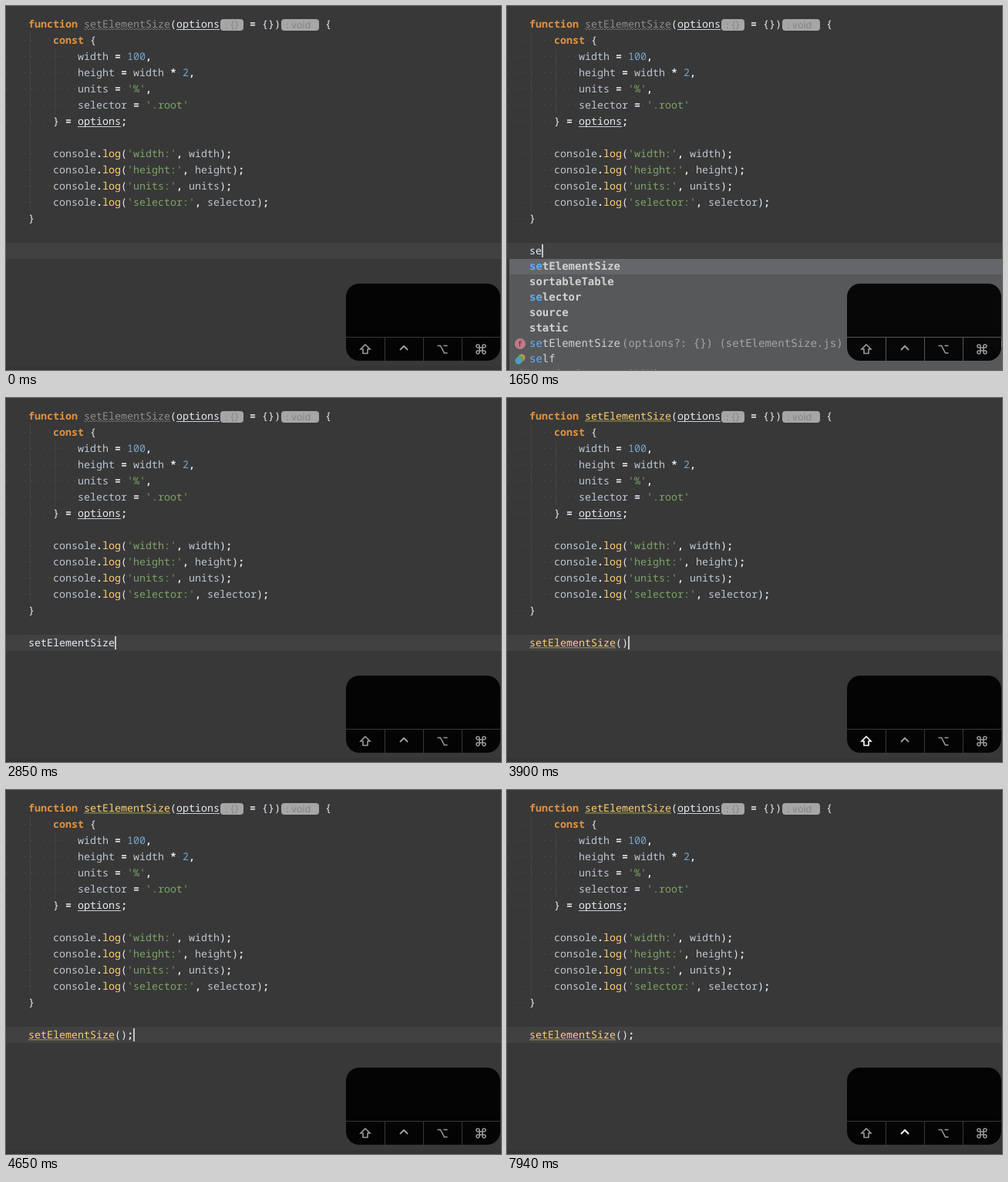
Animation of 642 by 472 pixels, one loop 8 s. Source, as an HTML page with a canvas:

```html
<!DOCTYPE html>
<html lang="en">
<head>
<meta charset="utf-8">
<title>Code completion</title>
<style>
html, body { margin: 0; width: 100%; height: 100%; overflow: hidden; background: #383838; }
canvas { display: block; }
</style>
</head>
<body>
<canvas id="stage" width="642" height="472"></canvas>
<script>
const ctx = document.getElementById('stage').getContext('2d');
ctx.textRendering = 'geometricPrecision';

const LOOP = 8000, LEFT = 29, CHAR = 8, LINE = 21, TOP = 13, ROW = 20;
const CODE = '13.33px "Noto Sans Mono", monospace';
const LIST = '14px "DejaVu Sans Mono", monospace';
const UI = 'Inter, sans-serif';
const COLORS = {
  keyword: '#e5923a', text: '#bcc5d0', white: '#e4ebf5', number: '#74a5cc',
  string: '#7da365', method: '#ffd06e', unused: '#8d8d8d', mark: '#7d8148',
  match: '#62aefa', item: '#d2d2d2', tail: '#a4a4a4'
};

const lineTop = n => TOP + n * LINE;

const source = [
  'function setElementSize(options',
  '    const {',
  '        width = 100,',
  '        height = width * 2,',
  "        units = '%',",
  "        selector = '.root'",
  '    } = options;',
  '',
  "    console.log('width:', width);",
  "    console.log('height:', height);",
  "    console.log('units:', units);",
  "    console.log('selector:', selector);",
  '}'
];

// Timelines: [start in ms, value]
const typed = [
  [0, ''], [1500, 's'], [1650, 'se'], [1950, 'set'], [2250, 'setE'],
  [2850, 'setElementSize'], [3750, 'setElementSize()'], [4500, 'setElementSize();']
];
const caretColumn = [
  [0, -1], [450, 0], [1050, -1], [1500, 1], [1650, 2], [1950, 3], [2250, 4],
  [2850, 14], [3450, -1], [3750, 15], [3900, 16], [4500, 17],
  [5250, 16], [5400, 15], [5550, 14], [5700, 13], [7050, -1], [7500, 13], [7940, -1]
];
const usages = [[0, false], [3300, true], [4950, false], [6000, true]];
const braces = [[0, false], [4050, true], [4500, false], [5250, true], [5400, false], [5550, true], [5700, false]];
const popup = [[0, null], [1500, 'first'], [1800, 'narrow'], [2400, 'final'], [2850, null], [4050, 'after'], [4500, null]];
const heldKey = [[0, ''], [2100, 'shift'], [2400, ''], [3450, 'shift'], [4050, ''], [7790, 'control']];

// Suffix "+" marks a function, "*" a plain global; the rest are bold words.
const lists = {
  first: ['setElementSize', 'sortableTable', 'selector', 'source', 'static', 'setElementSize+', 'self*', 'sessionStorage (DOM)*'],
  narrow: ['setElementSize', 'sortableTable', 'selector', 'selectedToElem', 'selected', 'setElementSize+', 'self*', 'sessionStorage (DOM)*'],
  final: ['setElementSize', 'sortableTable', 'selector', 'selectedToElem', 'selected', 'setElementSize+'],
  after: [' {', ';', '{', ' throws', ' :', 'setElementSize+', 'this']
};

const keys = [
  ['shift', 466, 445, 'M0-6L6 0H3V5.5H-3V0H-6Z'],
  ['control', 516, 443, 'M-5 3L0-2L5 3'],
  ['option', 566, 445, 'M-6.5-4.5H-2.5L2.5 5H6.5M1.5-4.5H6.5'],
  ['command', 616, 445, 'M-2-2H2V2H-2ZM-2-2H-4a2 2 0 1 1 2-2ZM2-2V-4a2 2 0 1 1 2 2ZM2 2H4a2 2 0 1 1-2 2ZM-2 2V4a2 2 0 1 1-2-2Z']
];

function valueAt(timeline, t) {
  return timeline.reduce((value, [start, next]) => t >= start ? next : value, timeline[0][1]);
}

function rect(x, y, w, h, color) {
  ctx.fillStyle = color;
  ctx.fillRect(x, y, w, h);
}

function text(str, x, y, color, font) {
  ctx.font = font;
  ctx.fillStyle = color;
  ctx.fillText(str, x, y);
}

function disc(x, y, r, color) {
  ctx.fillStyle = color;
  ctx.beginPath();
  ctx.arc(x, y, r, 0, 7);
  ctx.fill();
}

function wave(x, y, width) {
  ctx.strokeStyle = '#858585';
  ctx.lineWidth = 0.8;
  ctx.beginPath();
  for (let i = 0; i <= width; i += 2) ctx.lineTo(x + i, y + (i % 4 ? 1 : -1));
  ctx.stroke();
}

function tokenStyle(token, known) {
  if (/^(function|const)$/.test(token)) return ['keyword', 'bold '];
  if (token === 'log') return ['method', ''];
  if (token === 'setElementSize') return [known ? 'method' : 'unused', ''];
  if (token[0] === "'") return ['string', ''];
  if (/^\d/.test(token)) return ['number', ''];
  if (token === 'options') return ['white', ''];
  if (/^\w/.test(token)) return ['text', ''];
  return ['white', /[.,;=*]/.test(token) ? 'bold ' : ''];
}

function codeLine(str, x, top, known, marked) {
  for (const token of str.match(/'[^']*'|\w+|[^\w']/g) || []) {
    const width = token.length * CHAR;
    if (token === ' ') {
      rect(x + 3.5, top + 10, 1, 1, '#555');
    } else {
      const [color, weight] = tokenStyle(token, known);
      text(token, x, top + 15, COLORS[color], weight + CODE);
      if (token === 'options') rect(x, top + 17, width, 1, '#c5cbd3');
      if (token === 'setElementSize') {
        if (marked) rect(x, top + 16, width, 1.5, COLORS.mark);
        else if (!known) wave(x, top + 17, width);
      }
    }
    x += width;
  }
}

function badge(label, x, width) {
  ctx.fillStyle = '#a6a6a6';
  ctx.beginPath();
  ctx.roundRect(x, 17, width, 15, 4);
  ctx.fill();
  text(label, x + 6, 29, '#858585', '12.5px ' + UI);
}

function drawSource(known, marked) {
  rect(31, 33, 1, 232, '#434343');
  rect(63, 54, 1, 85, '#434343');
  source.forEach((line, n) => {
    if (line) codeLine('    ' + line, LEFT - 4 * CHAR, lineTop(n), known, marked);
  });
  badge(': {}', 278, 30);
  codeLine(' = {})', 308, TOP);
  badge(': void', 357, 49);
  codeLine(' {', 406, TOP);
}

function drawTypedLine(t, known, marked) {
  const top = lineTop(14), str = valueAt(typed, t), column = valueAt(caretColumn, t);
  if (valueAt(braces, t)) rect(LEFT + 14 * CHAR, top, 2 * CHAR, LINE, '#3b514d');
  if (known) codeLine(str, LEFT, top, known, marked);
  else text(str, LEFT, top + 15, COLORS.white, CODE);
  if (column >= 0) rect(LEFT + column * CHAR, top + 2, 2, 17, '#c4c4c4');
}

function drawItem(item, x, y, prefix) {
  const isFunction = item.endsWith('+'), isGlobal = item.endsWith('*');
  const name = item.replace(/[+*]$/, '');
  const font = (isFunction || isGlobal ? '' : 'bold ') + LIST;
  const matched = prefix && name.startsWith(prefix) ? prefix : '';
  const baseline = y + 14;
  ctx.font = font;
  const advance = ctx.measureText('m').width;
  text(matched, x, baseline, COLORS.match, font);
  text(name.slice(matched.length), x + matched.length * advance, baseline, COLORS.item, font);
  if (isFunction) {
    disc(x - 12, y + 10, 7, '#c17c86');
    text('f', x - 15.5, y + 14, '#682f3b', '11px "DejaVu Sans Mono", monospace');
    text('(options?: {}) (setElementSize.js)', x + 120, baseline, COLORS.tail, LIST);
    text('void', x + 592, baseline, COLORS.tail, LIST);
  } else if (isGlobal) {
    disc(x - 10, y + 8, 4.5, '#c79a50');
    disc(x - 12, y + 10, 4.5, '#699b59');
    disc(x - 14, y + 12, 4.5, '#4e9fb9');
  }
}

function drawPopup(t) {
  const kind = valueAt(popup, t);
  if (!kind) return;
  const after = kind === 'after', x = after ? 131 : 3, top = 328;
  const bottom = kind === 'final' ? 470 : 472;
  rect(x, top, 642 - x, bottom - top, '#57585a');
  rect(x, top, 642 - x, ROW, '#64666a');
  const prefix = after ? '' : valueAt(typed, t);
  lists[kind].forEach((item, i) => drawItem(item, x + 26, top + i * ROW, prefix));
  if (kind === 'final') {
    text('⌃↓ and ⌃↑ will move caret down and up in the editor', 8, 463, '#aaa', '10.8px ' + UI);
    text('Next Tip', 299, 463, COLORS.match, '10.8px ' + UI);
  }
}

function drawKeys(held) {
  ctx.save();
  ctx.beginPath();
  ctx.roundRect(441, 360, 200, 100, 17);
  ctx.clip();
  const shade = 'rgba(0,0,0,.92)';
  rect(441, 360, 200, 69, shade);
  for (let i = 0; i < 4; i++) rect(441 + i * 50 + (i ? 1 : 0), 430, i ? 49 : 50, 30, shade);
  ctx.restore();
  for (const [name, x, y, path] of keys) {
    ctx.save();
    ctx.translate(x, y);
    ctx.strokeStyle = name === held ? '#fff' : '#999';
    ctx.lineWidth = name === 'control' ? 2 : 1.6;
    ctx.stroke(new Path2D(path));
    ctx.restore();
  }
}

function frame(now) {
  const t = now % LOOP, known = t >= 3300, marked = valueAt(usages, t);
  rect(0, 0, 642, 472, '#383838');
  rect(0, 467, 642, 5, '#343434');
  rect(0, lineTop(14), 642, LINE, '#414141');
  drawSource(known, marked);
  drawTypedLine(t, known, marked);
  drawPopup(t);
  drawKeys(valueAt(heldKey, t));
  requestAnimationFrame(frame);
}
frame(performance.now());
</script>
</body>
</html>
```
